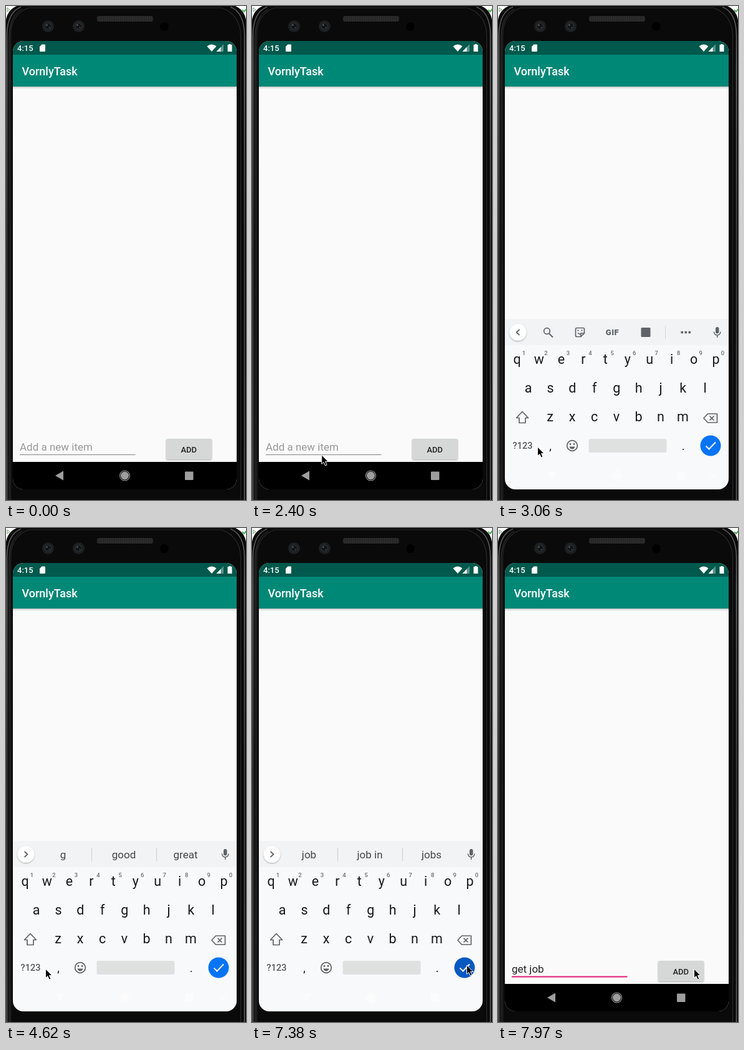
Write an HTML page that moves like this. It is 385 px wide and 791 px high and loops after 8 s.

```html
<!DOCTYPE html>
<html lang="en">
<head>
<meta charset="utf-8">
<title>Task list demo</title>
<style>
html, body { margin: 0; width: 100%; height: 100%; overflow: hidden; background: #fff; }
svg { display: block; width: 385px; height: 791px; font-family: Roboto, sans-serif; }
.med { font-weight: 500; }
.mid { text-anchor: middle; }
.line { fill: none; stroke: #5f6368; stroke-width: 1.7; stroke-linejoin: round; }
.icon { fill: #5f6368; }
</style>
</head>
<body>
<svg viewBox="0 0 385 791">
  <defs>
    <clipPath id="screen"><rect x="11" y="56" width="359" height="718" rx="17"/></clipPath>
    <linearGradient id="rim" x1="0" y1="0" x2="0" y2="1">
      <stop offset="0" stop-color="#555"/><stop offset=".12" stop-color="#777"/>
      <stop offset=".5" stop-color="#484848"/><stop offset="1" stop-color="#666"/>
    </linearGradient>
    <linearGradient id="drop" x1="0" y1="0" x2="0" y2="1">
      <stop offset="0" stop-opacity=".2"/><stop offset="1" stop-opacity="0"/>
    </linearGradient>
    <filter id="soft" x="-20%" y="-20%" width="140%" height="150%">
      <feDropShadow dx="0" dy="1" stdDeviation="1" flood-opacity=".35"/>
    </filter>
    <pattern id="mesh" width="3" height="3" patternUnits="userSpaceOnUse">
      <rect width="3" height="3" fill="#303030"/><rect width="1.3" height="3" fill="#202020"/>
    </pattern>
  </defs>

  <!-- phone body -->
  <rect width="385" height="791" fill="#fff"/>
  <path d="M2 3l4 3-4 3z" fill="none" stroke="#6a9a70"/>
  <path d="M379 6l3 3 5-6" fill="none" stroke="#4caf50" stroke-width="2"/>
  <path d="M0 22Q3 6 17 0H368Q382 6 385 22V791H0Z" fill="#0a0a0a"/>
  <g fill="none" stroke="url(#rim)">
    <path d="M1.5 791V46Q2 10 24 1.5" stroke-width="1.5"/>
    <path d="M7.5 791V48Q7 14 36 3H346Q376 14 376.500 48V791" stroke="#2b2b2b" stroke-width="1.2"/>
    <path d="M5 791V48Q6 16 26 5" stroke-width="1" opacity=".6"/>
    <path d="M382.500 791V46Q382 10 360 1.500" stroke-width="1.5"/>
  </g>
  <rect x="146" y="16" width="90" height="9" rx="3" fill="url(#mesh)"/>
  <g id="lenses"></g>
  <circle cx="254" cy="33" r="7" fill="#000"/>

  <g clip-path="url(#screen)">
    <rect x="11" y="56" width="359" height="718" fill="#fafafa"/>
    <rect x="11" y="129" width="359" height="4" fill="url(#drop)"/>
    <rect x="11" y="78" width="359" height="51" fill="#008877"/>
    <rect x="11" y="56" width="359" height="22" fill="#00594c"/>
    <g fill="#fff">
      <text class="med" x="18" y="72" font-size="13">4:15</text>
      <path d="M57.500 61.500H62Q63 61.500 63 62.500V72Q63 73 62 73H55Q54 73 54 72V65Z"/>
      <path d="M322.500 64.500Q330 58.500 337.500 64.500L330 73Z"/>
      <path d="M349 61V73H337.500Z" opacity=".35"/><path d="M344.500 65.700V73H337.500Z"/>
      <path d="M357.500 62V61H360.500V62H362.500V73H355.500V62Z"/>
      <text class="med" x="25.500" y="110.500" font-size="18">VornlyTask</text>
    </g>

    <g id="form">
      <text id="entry" x="22" y="711.500" font-size="17"></text>
      <rect id="under" x="22" width="185.500"/>
      <rect id="caret" y="697" width="2" height="18" fill="#d81b60"/>
      <rect x="257" y="693" width="73" height="33" rx="2" fill="#d6d7d7" filter="url(#soft)"/>
      <text class="med mid" x="293.300" y="714.500" font-size="13" fill="#222">ADD</text>
    </g>

    <rect x="11" y="730" width="359" height="44" fill="#000"/>

    <g id="board">
      <rect x="11" y="501" width="359" height="300" fill="#f8f9fa"/>
      <rect x="11" y="501" width="359" height="42" fill="#f1f3f4"/>
      <circle cx="32" cy="522.500" r="13.500" fill="#fff" filter="url(#soft)"/>
      <path id="chevron" class="line" d="M-2.500 -4.500L2.500 0L-2.500 4.500"/>
      <g id="tools">
        <circle class="line" cx="78.500" cy="520.500" r="4.800"/><path class="line" d="M82 524.500l6 6" style="stroke-width:2"/>
        <path class="line" d="M126.500 515.500H136.500Q138.500 515.500 138.500 517.500V524L133 529.500H126.500Q124.500 529.500 124.500 527.500V517.500Q124.500 515.500 126.500 515.500ZM138 524H133V529M128 523.500q3 3 5 1"/>
        <path class="icon" d="M127.500 518.500h2v2h-2zM133.500 518.500h2v2h-2z"/>
        <text class="mid icon" x="183.500" y="527" font-size="13" font-weight="900" letter-spacing=".5">GIF</text>
        <rect class="icon" x="229.500" y="515" width="15" height="15" rx="1.500"/>
        <path d="M268.500 512.500V533" stroke="#d5d7d9"/>
        <path class="icon" d="M293.500 520.700h3.600v3.600h-3.600zM299.500 520.700h3.600v3.600h-3.600zM305.500 520.700h3.600v3.600h-3.600z"/>
      </g>
      <g id="hints" class="mid" font-size="17" fill="#44474a">
        <text x="91.500" y="529"></text><text x="189" y="529"></text><text x="288" y="529"></text>
        <path d="M137.500 512V533.500M241.500 512V533.500" stroke="#d2d4d6" stroke-width="1.300"/>
      </g>
      <rect class="icon" x="349" y="514" width="5.500" height="10.500" rx="2.700"/>
      <path class="line" d="M346.500 521.500Q347 527 351.700 527T357 521.500M351.700 527V531" style="stroke-width:1.500"/>
      <g id="keys" class="mid" fill="#17191b"></g>
      <path class="line" d="M39 649.500L29.500 659.500H34V667.500H44V659.500H48.500Z"/>
      <path class="line" d="M336.500 653H351.500V667H336.500L330 660ZM339.500 656.500l7 7M346.500 656.500l-7 7"/>
      <text class="med mid" x="39.500" y="709" font-size="14.500" fill="#55595d">?123</text>
      <circle class="line" cx="119" cy="704" r="8.300"/>
      <path class="icon" d="M114.500 705.500H123.500Q122.500 709.500 119 709.500T114.500 705.500Z"/>
      <circle class="icon" cx="116" cy="701.500" r="1.400"/><circle class="icon" cx="122" cy="701.500" r="1.400"/>
      <rect x="145.500" y="693" width="125" height="22" rx="3" fill="#dfe1e1"/>
      <circle id="done" cx="341" cy="704" r="16.500"/>
      <path d="M333.500 704.500L338.500 709.500L349 698.500" fill="none" stroke="#fff" stroke-width="2"/>
    </g>

    <g fill="#fff" fill-opacity=".62">
      <path id="back" d="M-8 0L5 -7.500V7.500Z"/>
      <circle cx="190.500" cy="752" r="6.500"/>
      <circle cx="190.500" cy="752" r="8" fill="none" stroke="#fff" stroke-opacity=".62" stroke-width="1.100"/>
      <rect x="287" y="745.500" width="13.500" height="13.500" rx="1"/>
      <g id="ime"></g>
    </g>
  </g>

  <path id="cursor" d="M0 0V14.500L3.300 11.500L5.700 17L8.300 15.900L6 10.500H10.400Z" fill="#000" stroke="#fff" stroke-width="1"/>
</svg>

<script>
const LOOP = 8000;
const $ = id => document.getElementById(id);
const clamp = v => Math.max(0, Math.min(1, v));
const ramp = (t, a, b) => clamp((t - a) / (b - a));
const between = (t, a, b) => t >= a && t < b;
const show = (el, on) => { el.style.display = on ? "" : "none"; };

function add(parent, tag, attrs, text) {
  const el = document.createElementNS("http://www.w3.org/2000/svg", tag);
  for (const k in attrs) el.setAttribute(k, attrs[k]);
  if (text) el.textContent = text;
  parent.append(el);
  return el;
}

function buildKeys() {
  const rows = [["qwertyuiop", 30.5, 573], ["asdfghjkl", 48.5, 619], ["zxcvbnm", 83.7, 665]];
  for (const [letters, x0, y] of rows) {
    [...letters].forEach((c, i) => {
      const x = x0 + i * 35.45;
      add($("keys"), "text", { x, y, "font-size": 21.5 }, c);
      if (y === 573) {
        add($("keys"), "text", { x: x + 11, y: 558.5, "font-size": 9.5, class: "med", fill: "#6a6d70" }, String((i + 1) % 10));
      }
    });
  }
  add($("keys"), "text", { x: 84, y: 710.5, "font-size": 18 }, ",");
  add($("keys"), "text", { x: 297, y: 710.5, "font-size": 18 }, ".");
}

function buildDetails() {
  for (const x of [67.5, 116.5]) {
    add($("lenses"), "circle", { cx: x, cy: 32.5, r: 9.5, fill: "#1d2022" });
    add($("lenses"), "circle", { cx: x, cy: 32.5, r: 5, fill: "#111315", stroke: "#33383b" });
    add($("lenses"), "circle", { cx: x - 2, cy: 30.5, r: 1.2, fill: "#59656b" });
    add($("lenses"), "circle", { cx: x + 2, cy: 34.5, r: 1, fill: "#465056" });
  }
  for (let r = 0; r < 2; r++) {
    for (let c = 0; c < 6; c++) {
      add($("ime"), "rect", { x: 338.5 + c * 2.6, y: 748 + r * 2.8, width: 1.6, height: 1.6 });
    }
  }
  add($("ime"), "rect", { x: 341.5, y: 754, width: 8.5, height: 1.8 });
}

// time, x, y of the pointer tip
const PATH = [
  [830, 304, 703], [865, 296, 590], [900, 280, 450], [935, 263, 340], [970, 253, 276],
  [1150, 253, 276], [1190, 228, 238], [1230, 182, 256], [1270, 144, 320], [1310, 127.5, 408],
  [1350, 127, 535], [1390, 131, 650], [1420, 135, 695],
  [1570, 135, 695], [1700, 122, 711], [1840, 112, 719],
  [2400, 112, 719], [2500, 84, 712], [2600, 63.5, 706],
  [6740, 63.5, 706], [6780, 170, 710], [6810, 280, 717], [6840, 386, 725],
  [7010, 386, 722], [7100, 368, 716], [7200, 352, 705], [7290, 344.5, 700],
  [7840, 344.5, 700], [7900, 326, 704], [7970, 314.5, 706], [LOOP, 314.5, 706]
];

// suggestions after each typed letter
const HINTS = [
  [4620, "g", "good", "great"], [4760, "ge", "get", "getting"], [4850, "get", "got", "gets"],
  [5030, "the", "it", "a"], [5420, "j", "just", "I"], [5630, "jo", "join", "job"],
  [5770, "job", "job in", "jobs"]
];

function pointer(t) {
  const i = PATH.findIndex(p => p[0] > t);
  if (i < 1) return null;
  const [a, x0, y0] = PATH[i - 1], [b, x1, y1] = PATH[i];
  const k = ramp(t, a, b);
  return [x0 + (x1 - x0) * k, y0 + (y1 - y0) * k];
}

function draw(t) {
  const at = pointer(t);
  show($("cursor"), at);
  if (at) $("cursor").setAttribute("transform", `translate(${at})`);

  // input row
  const focused = t >= 2650, typed = t >= 4620;
  show($("form"), !between(t, 2830, 7440));
  $("entry").textContent = typed ? "get job" : "Add a new item";
  $("entry").setAttribute("fill", typed ? "#222" : "#999");
  $("under").setAttribute("fill", focused ? "#e31b73" : "#858585");
  $("under").setAttribute("y", focused ? 717.5 : 718);
  $("under").setAttribute("height", focused ? 2 : 1);
  $("caret").setAttribute("x", typed ? 72.5 : 22);
  show($("caret"), focused && t < 7900);

  // keyboard window
  const open = (1 - (1 - ramp(t, 2840, 2995)) ** 2) * (1 - ramp(t, 7440, 7600));
  show($("board"), open > 0);
  $("board").setAttribute("opacity", open);
  $("board").setAttribute("transform", `translate(0 ${118 * (1 - open)})`);
  const tools = ramp(t, 2990, 3060);
  show($("tools"), t < 4620);
  $("tools").setAttribute("opacity", tools);
  const left = tools > .5 && t < 4620;
  $("chevron").setAttribute("transform", `translate(32 522.500) scale(${left ? -1 : 1} 1)`);
  show($("hints"), typed);
  const hint = HINTS.findLast(h => h[0] <= t);
  if (hint) $("hints").querySelectorAll("text").forEach((el, i) => { el.textContent = hint[i + 1]; });
  $("done").setAttribute("fill", between(t, 7350, 7600) ? "#0858c2" : "#0574f5");

  // navigation icons
  const turn = ramp(t, 2840, 3020) * (1 - ramp(t, 7440, 7600));
  $("back").setAttribute("transform", `translate(87 ${752 - 1.5 * turn}) rotate(${-90 * turn})`);
  $("ime").setAttribute("opacity", ramp(t, 2840, 2920) * (1 - ramp(t, 7340, 7375)));
}

buildKeys();
buildDetails();
const start = performance.now();
(function tick() {
  draw((performance.now() - start) % LOOP);
  requestAnimationFrame(tick);
})();
</script>
</body>
</html>
```
